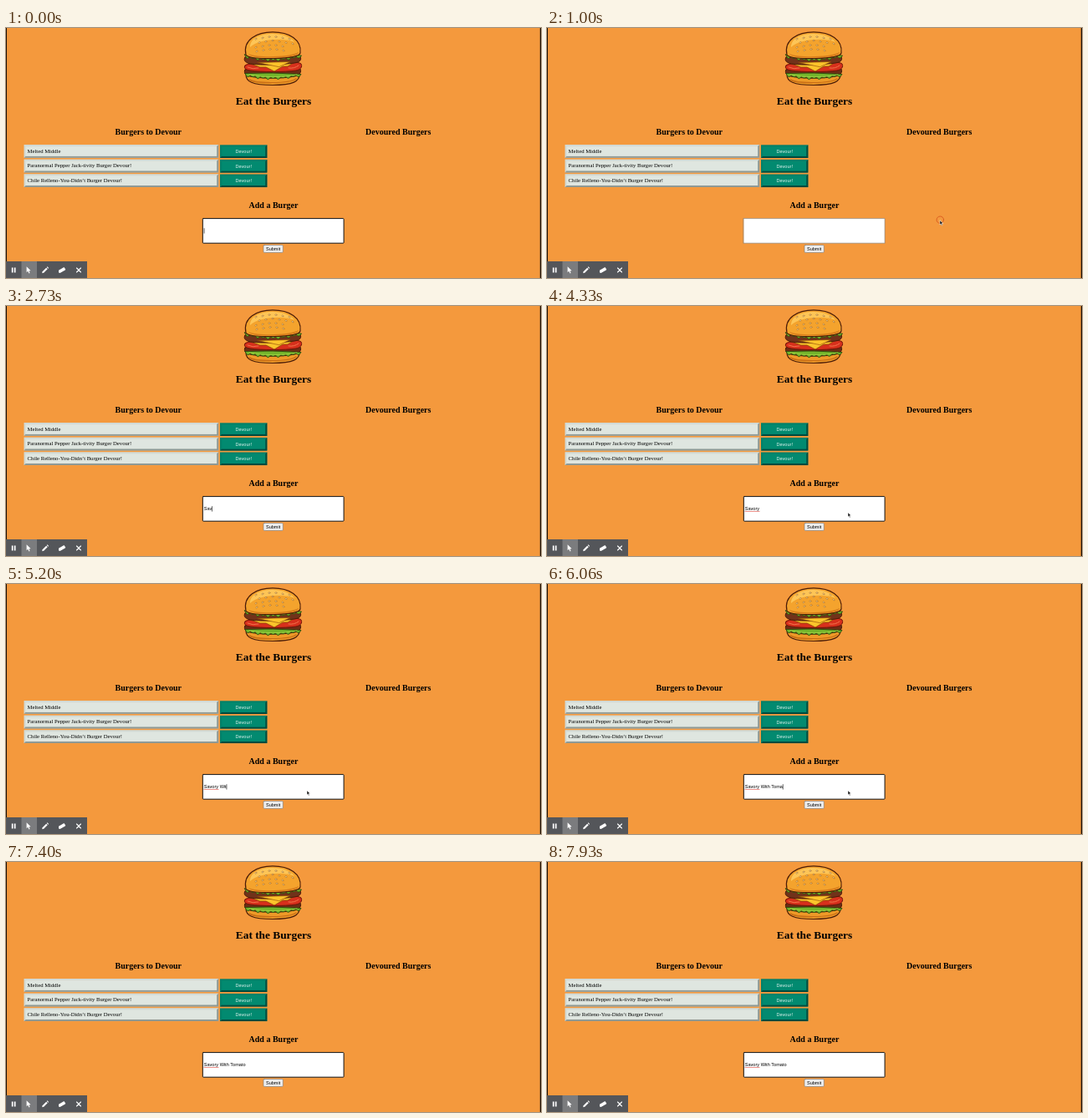
Write an HTML page with a canvas that moves like this. It is 640 px wide and 300 px high and loops after 8 s.

```html
<!DOCTYPE html>
<html lang="en">
<head>
<meta charset="utf-8">
<title>Eat the Burgers</title>
<style>
  html, body { margin: 0; width: 100%; height: 100%; overflow: hidden; background: #f4993d; }
  canvas { display: block; width: 640px; height: 300px; }
</style>
</head>
<body>
<canvas id="stage" width="640" height="300"></canvas>
<script>
const ctx = document.getElementById('stage').getContext('2d');
const LOOP = 8000;
const ZOOM = 1 / 2.4; // page pixels to stage pixels
const SERIF = '"Liberation Serif", "Times New Roman", serif';
const SANS = '"Liberation Sans", Arial, sans-serif';
const ENTRY = 'Savory With Tomato';
const BURGERS = [
  'Melted Middle',
  'Paranormal Pepper Jack-tivity Burger Devour!',
  'Chile Relleno-You-Didn’t Burger Devour!'
];

// Moment each character of the entry appears
const KEYS = [2450, 2720, 2720, 2925, 3055, 3195, 3725];
for (let i = 0; i < 9; i++) KEYS.push(4725 + i * 160);
KEYS.push(6195, 6420);

const BLUR = 925, FOCUS = 1725;
const MOVES = [
  { from: 260, to: 860, a: [408, 252], b: [470, 231] },
  { from: 1125, to: 1530, a: [470, 231], b: [360, 248] }
];

function rect(x, y, w, h, fill) {
  ctx.fillStyle = fill;
  ctx.fillRect(x, y, w, h);
}

function poly(fill, ...pts) {
  ctx.fillStyle = fill;
  ctx.beginPath();
  for (let i = 0; i < pts.length; i += 2) ctx.lineTo(pts[i], pts[i + 1]);
  ctx.closePath();
  ctx.fill();
}

function shape(d, fill, stroke, width = 1) {
  const p = new Path2D(d);
  if (fill) { ctx.fillStyle = fill; ctx.fill(p); }
  if (stroke) {
    ctx.strokeStyle = stroke;
    ctx.lineWidth = width;
    ctx.lineJoin = ctx.lineCap = 'round';
    ctx.stroke(p);
  }
}

function box(x, y, w, h, r, fill, stroke, width) {
  ctx.beginPath();
  ctx.roundRect(x, y, w, h, r);
  ctx.fillStyle = fill;
  ctx.fill();
  ctx.strokeStyle = stroke;
  ctx.lineWidth = width;
  ctx.stroke();
}

function text(str, x, y, font, align = 'left', fill = '#000') {
  ctx.save();
  ctx.translate(x, y);
  ctx.scale(ZOOM, ZOOM);
  ctx.font = font;
  ctx.textAlign = align;
  ctx.fillStyle = fill;
  ctx.fillText(str, 0, 0);
  ctx.restore();
}

function textWidth(str, font) {
  ctx.font = font;
  return ctx.measureText(str).width * ZOOM;
}

function bevel(x, y, w, h, b, fill, light, dark) {
  rect(x, y, w, h, light);
  poly(dark, x + w, y, x + w, y + h, x, y + h, x + b, y + h - b, x + w - b, y + h - b, x + w - b, y + b);
  rect(x + b, y + b, w - 2 * b, h - 2 * b, fill);
}

function lettuce(y, x0, x1, sag) {
  const n = 11, step = (x1 - x0) / n;
  let d = `M${x0} ${y}`;
  for (let i = 1; i <= n; i++) {
    const x = x0 + i * step, bow = sag * Math.sin(Math.PI * i / n);
    d += ` Q${x - step / 2} ${y + bow + (i % 2 ? 6.5 : 4)} ${x} ${y + bow + 1}`;
  }
  shape(d + ` Q${(x0 + x1) / 2} ${y + sag - 5} ${x0} ${y}Z`, '#73b52c', '#2c4d0c', 0.9);
  shape(`M${x0 + 5} ${y + 1.5} Q${(x0 + x1) / 2} ${y + sag * 2} ${x1 - 5} ${y + 1.5}`, null, '#a9d84a', 0.8);
}

function burger() {
  const ink = '#4b1c08';
  shape('M287 56 C287 64 294 68.5 319 68.5 C344 68.5 351 64 351.5 55Z', '#ee9a28', ink, 1.2);
  shape('M291 62 C299 67 338 67 347 61', null, '#c96e16', 1.5);
  shape('M286 50 C290 45 348 44 352 49 C354 53 351 57 345 58 C331 61 305 61 292 58 C286 57 284 53 286 50Z', '#6b2d15', ink, 1);
  lettuce(54.5, 286, 353, 3.5);
  shape('M286 45 C289 40 348 38 353 43 C355 47 352 50 347 51 C333 53 306 53 292 51 C286 50 284 48 286 45Z', '#d7301c', '#701407', 1);
  shape('M289 47 Q295 50 302 48 M338 48 Q345 49 350 45', null, '#f3754d', 1);
  shape('M293 43 L345 41 L337 46 L331 46 L321 52 L311 47 L304 47Z', '#fcc42b', '#8a4508', 0.8);
  shape('M286 35 C291 31 349 29 352 34 C354 39 351 41 345 42 C331 44 306 45 292 43 C285 41 284 38 286 35Z', '#71321a', ink, 1);
  shape('M301 41.5 L340 40.5 L327 46.5Z', '#fcc42b', '#8a4508', 0.6);
  lettuce(32, 285.5, 353.5, 4);
  shape('M287 32 C283 14 300 4.8 319 4.8 C339 4.8 354 14 352 30 C351 34 342 36 321 36.5 C301 37 289 36 287 32Z', '#f4a32d', ink, 1.2);
  shape('M290 31 C302 36 339 35 350 29 C350 33 337 35.5 320 35.5 C303 36 291 34.5 290 31Z', '#d97d1b');
  shape('M292 23 C292 13 303 7 319 7 C331 7 341 11 345 17 C335 12 303 12 292 23Z', '#fdc557');
  for (let i = 0; i < 22; i++) {
    const row = i % 4, col = Math.floor(i / 4);
    const x = 299 + col * 8 + (row % 2) * 4 - (row === 3 ? 3 : 0);
    const y = 10 + row * 5 + Math.abs(x - 319) * 0.16;
    ctx.beginPath();
    ctx.ellipse(x, y, 1.2, 0.75, (x - 319) / 35, 0, Math.PI * 2);
    ctx.fillStyle = '#ffe9a8';
    ctx.fill();
    ctx.strokeStyle = '#8c4a10';
    ctx.lineWidth = 0.45;
    ctx.stroke();
  }
}

function page() {
  rect(0, 0, 640, 300, '#f4993d');
  rect(0, 0, 1, 300, '#1c1108');
  rect(638.8, 0, 1.2, 300, '#1c1108');
  burger();
  const h2 = 'bold 24px ' + SERIF;
  text('Eat the Burgers', 320, 92.4, 'bold 32px ' + SERIF, 'center');
  text('Burgers to Devour', 170.3, 128.4, h2, 'center');
  text('Devoured Burgers', 469.2, 128.4, h2, 'center');
  text('Add a Burger', 320, 215.8, h2, 'center');
  BURGERS.forEach((name, i) => {
    const y = 140 + i * 17.6;
    bevel(21.5, y, 232.7, 15.8, 2.1, '#dfe6e0', '#d2dad5', '#8f9994');
    text(name, 25.6, y + 9.8, '16px ' + SERIF);
    bevel(256, y + 0.3, 56.3, 15.6, 2.1, '#028a70', '#038069', '#034a3d');
    text('Devour!', 284.2, y + 10, '13.33px ' + SANS, 'center', '#e2f3ee');
  });
  box(308, 260.6, 23.3, 8.8, 1, '#efefef', '#767676', 0.6);
  text('Submit', 319.6, 266.9, '13.33px ' + SANS, 'center');
}

function toolbar() {
  rect(0, 280, 97, 20, '#54565a');
  rect(18.5, 280, 18.5, 20, '#7b7c7e');
  rect(6.8, 287.5, 1.7, 6, '#fff');
  rect(9.8, 287.5, 1.7, 6, '#fff');
  poly('#fff', 24.6, 286.3, 24.6, 293.3, 26.2, 291.8, 27.5, 294.6, 28.6, 294.1, 27.4, 291.4, 29.6, 291.3);
  poly('#fff', 43.2, 294.2, 43.6, 292.2, 48.1, 287.7, 49.7, 289.3, 45.2, 293.8);
  poly('#fff', 48.7, 287.1, 49.5, 286.3, 51.1, 287.9, 50.3, 288.7);
  poly('#fff', 63, 290.8, 69.4, 286.9, 71.2, 289.6, 70.8, 290.6, 64.6, 294.1, 63, 293.4);
  shape('M84.5 288 L89.5 293 M89.5 288 L84.5 293', null, '#fff', 1.1);
}

function field(t) {
  const focused = t < BLUR || t >= FOCUS;
  box(235.3, 228.6, 168.8, 29.6, focused ? 0.8 : 0, '#fff', focused ? '#101010' : '#767676', focused ? 1 : 0.6);
  const font = '13.33px ' + SANS;
  const count = KEYS.filter(k => k <= t).length;
  const typed = ENTRY.slice(0, count);
  text(typed, 236.8, 245.3, font);
  if (count > 6) {
    const w = textWidth('Savory', font);
    shape(`M237 246.5 H${236.8 + w}`, null, '#e0493f', 0.6);
  }
  const last = count ? KEYS[count - 1] : t < FOCUS ? -240 : FOCUS;
  if (focused && (t - last) % 1000 < 500) {
    rect(236.8 + textWidth(typed, font), 240.2, 0.6, 6.4, '#000');
  }
}

function pointer(t) {
  const shown = (t >= 260 && t < 2450) || (t >= 4320 && t < 6860);
  if (!shown) return;
  const m = t < 1125 ? MOVES[0] : MOVES[1];
  const p = Math.min(1, Math.max(0, (t - m.from) / (m.to - m.from)));
  const e = p * p * (3 - 2 * p);
  const x = m.a[0] + (m.b[0] - m.a[0]) * e;
  const y = m.a[1] + (m.b[1] - m.a[1]) * e;
  if ((t >= BLUR && t < 1125) || (t >= FOCUS && t < FOCUS + 200)) {
    ctx.beginPath();
    ctx.arc(x + 0.3, y - 0.8, 4.2, 0, Math.PI * 2);
    ctx.strokeStyle = '#d9571f';
    ctx.lineWidth = 0.9;
    ctx.stroke();
  }
  shape(`M${x} ${y} v5 l1.2 -1.1 l0.9 2 l0.9 -0.4 l-0.9 -1.9 h1.6Z`, '#111', '#fff', 0.5);
}

function draw(now) {
  const t = now % LOOP;
  page();
  field(t);
  pointer(t);
  toolbar();
}

const start = performance.now();
function tick() {
  draw(performance.now() - start);
  requestAnimationFrame(tick);
}
tick();
</script>
</body>
</html>
```
